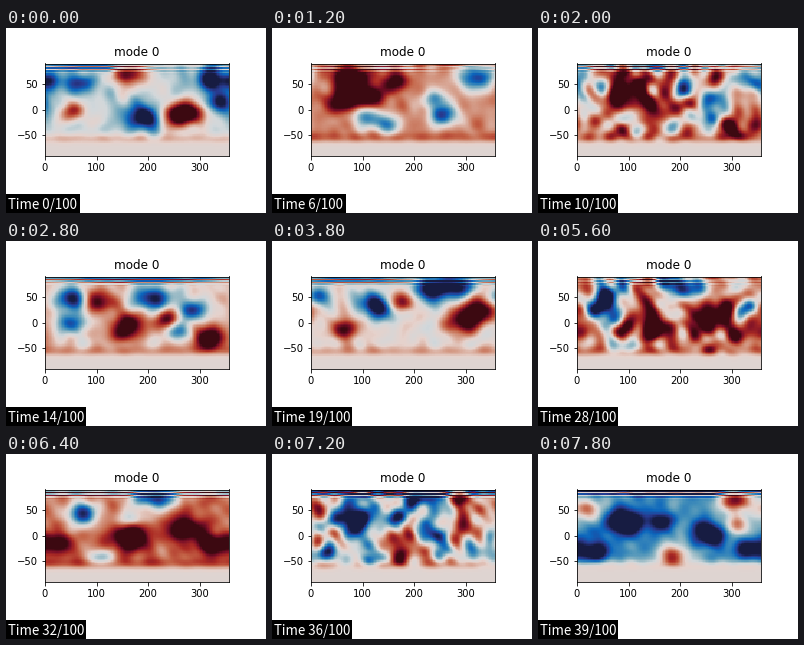
These frames come from a looping animation (260x185 px, 8000 ms). A matplotlib script:

```python
import numpy as np
import matplotlib.pyplot as plt
from matplotlib.animation import FuncAnimation
from matplotlib.colors import LinearSegmentedColormap
from matplotlib.patches import Rectangle

W, H, DPI = 260, 185, 100
STEPS, STEP_MS = 40, 200
PX = 72 / DPI  # points per pixel

plt.rcParams.update({
    "font.family": "DejaVu Sans", "font.size": 10 * PX,
    "axes.titlesize": 12 * PX, "axes.titlepad": 7 * PX,
    "axes.linewidth": 0.8 * PX,
})
for side in ("xtick", "ytick"):
    plt.rcParams[side + ".major.size"] = 3.5 * PX
    plt.rcParams[side + ".major.width"] = 0.8 * PX
    plt.rcParams[side + ".major.pad"] = 3.5 * PX

BALANCE = LinearSegmentedColormap.from_list("balance", [
    "#171c42", "#293a8f", "#0b66bd", "#4590b9", "#8eb5c2", "#d2d8db",
    "#e6d2cc", "#d59d89", "#c46548", "#ac2b24", "#780e28", "#3c0911"])

# step: overall tone, then warm and cold centres (lon, lat), strongest first
STATES = {
    0: (-0.15, [(258, -12), (165, 68), (285, -5), (50, -4)],
        [(194, -15), (325, 58), (342, 12), (70, 52), (8, 55)]),
    6: (0.35, [(75, 65), (62, 15), (112, 25), (160, 55)],
        [(322, 62), (258, -10), (144, -28), (98, -12), (240, 22)]),
    14: (0.1, [(320, -32), (165, -2), (106, 42), (237, 8), (145, -24)],
         [(210, 47), (52, 47), (288, 24), (50, 0), (260, -18)]),
    19: (0, [(326, 24), (295, 0), (66, -12), (174, 40)],
         [(235, 66), (285, 70), (136, 24), (116, 42), (15, 50)]),
    24: (-0.1, [(268, 32), (128, 42), (130, -18), (230, -8), (75, -14)],
         [(40, 18), (66, 62), (322, 32), (215, 60)]),
    32: (0.45, [(165, -4), (273, 12), (325, -18), (20, -15)],
         [(70, 43), (230, 74), (190, 74), (108, -46), (167, 34)]),
    39: (-0.5, [(307, 70), (188, -40), (16, 52), (310, 20)],
         [(92, 26), (258, 4), (30, -32), (335, -26), (162, 28)]),
}
KEYS = list(STATES)

lon, lat = np.meshgrid(np.arange(128) * 360 / 128, np.linspace(90, -90, 64))
theta = np.radians(lon)


def ramp(edge, width):
    return 1 / (1 + np.exp(-(lat - edge) / width))


south, polar = ramp(-58, 4), ramp(77, 2)
red_belt = 0.25 * np.exp(-((lat + 56) / 10) ** 2)


def centres(points, drift):
    """Sum of bumps; weaker ones are also smaller."""
    total = 0
    for k, (x, y) in enumerate(points):
        power = 1.3 * 0.87 ** k
        dx = (lon - x - drift + 180) % 360 - 180
        r2 = (dx / (9 + 11 * power)) ** 2 + ((lat - y) / (7 + 8 * power)) ** 2
        total = total + power * np.exp(-r2 / 2)
    return total


def pattern(step, drift):
    tone, warm, cold = STATES[step]
    stripes = np.sin(1.05 * lat + step + 0.5 * np.sin(theta + step))
    return (tone + centres(warm, drift) - centres(cold, drift)
            + 0.7 * polar * stripes)


def eddies(i):
    """Small waves that travel east, bent so that they do not look regular."""
    rng = np.random.default_rng(7)
    total = 0
    for _ in range(14):
        m, n = rng.integers(2, 9), rng.uniform(-7, 7)
        phase, speed = rng.uniform(0, 2 * np.pi), rng.uniform(0.3, 1)
        bend = np.sin(2 * theta + np.radians(3 * lat) + phase)
        total = total + np.sin(m * theta + np.radians(n * lat)
                               + bend + phase - speed * i)
    return total / np.sqrt(14)


def field(i):
    k = min(np.searchsorted(KEYS, i, side="right"), len(KEYS) - 1)
    k0, k1 = KEYS[k - 1], KEYS[k]
    u = (i - k0) / (k1 - k0)
    f = (np.cos(u * np.pi / 2) * pattern(k0, 3 * (i - k0))
         + np.sin(u * np.pi / 2) * pattern(k1, 3 * (i - k1)))
    churn = 0.1 + 0.25 * np.sin(np.pi * u)
    return (f + churn * eddies(i)) * south + red_belt + 0.02


fig = plt.figure(figsize=(W / DPI, H / DPI), dpi=DPI, facecolor="white")
ax = fig.add_axes([39 / W, 57 / H, 184 / W, 92.5 / H])
image = ax.imshow(field(0), cmap=BALANCE, vmin=-1.05, vmax=1.05, aspect="auto",
                  extent=(0, 357.19, -90, 90), interpolation="nearest")
ax.set_xticks([0, 100, 200, 300])
ax.set_yticks([-50, 0, 50])
ax.set_title("mode 0")

box = fig.add_artist(Rectangle((0, 0), 74 / W, 19 / H, color="black", lw=0))
label = fig.text(2 / W, 4 / H, "", color="white", fontsize=13.3 * PX,
                 family="Noto Sans CJK JP", va="baseline", zorder=5)


def update(i):
    image.set_data(field(i))
    label.set_text(f"Time {i}/100")
    box.set_width((74 if i < 10 else 80) / W)
    return image, label, box


anim = FuncAnimation(fig, update, frames=STEPS, interval=STEP_MS,
                     repeat=True, repeat_delay=0, blit=False)
plt.show()
```
